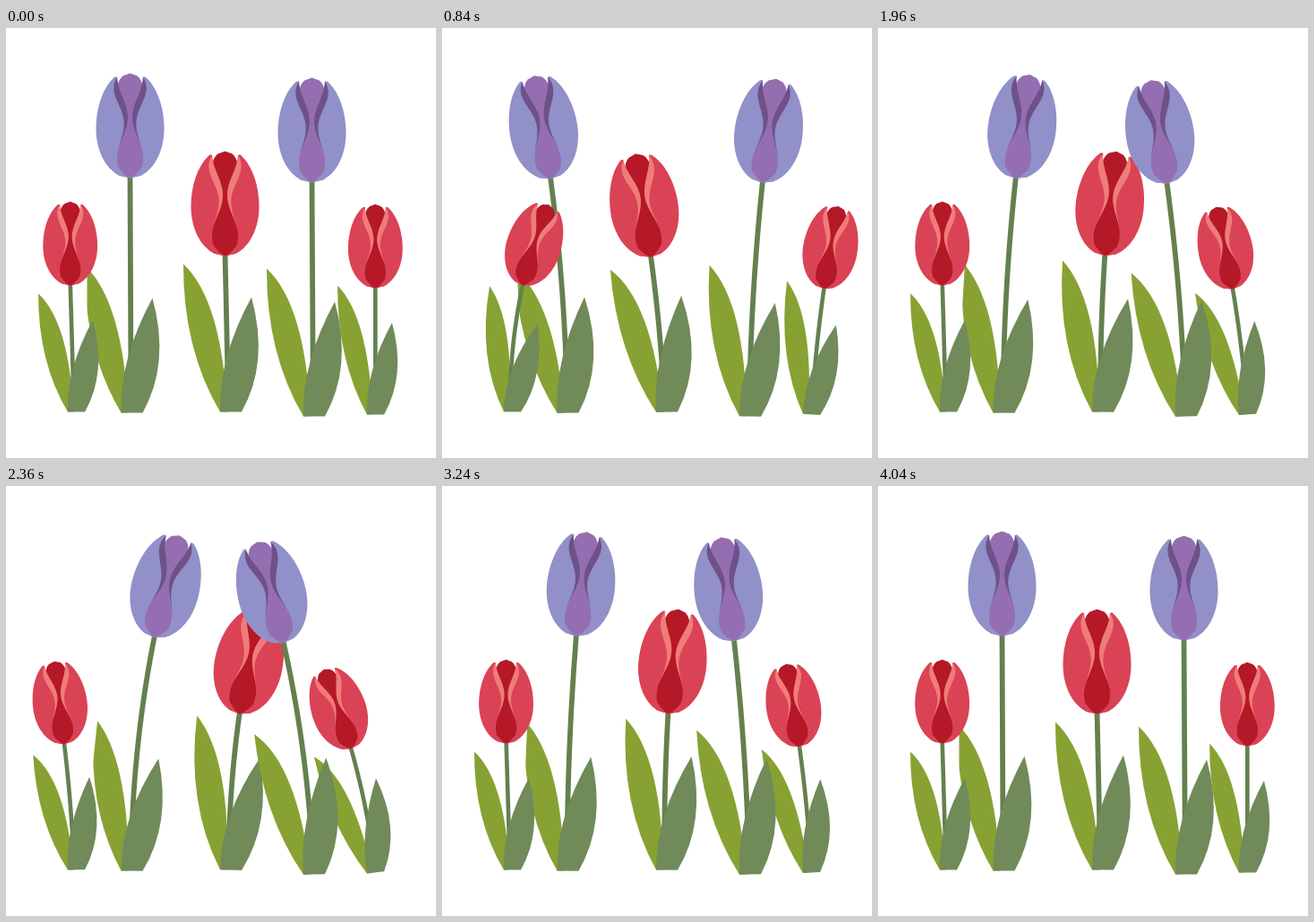
Recreate the animation shown at these times as an HTML page with a canvas. Size 480 px wide and 480 px high, loop 4080 ms.

```html
<!DOCTYPE html>
<html lang="en">
<head>
<meta charset="utf-8">
<title>Swaying tulips</title>
<style>
  html, body { margin: 0; width: 100%; height: 100%; overflow: hidden; background: #fff; }
  canvas { display: block; }
</style>
</head>
<body>
<canvas id="stage" width="480" height="480"></canvas>
<script>
const ctx = document.getElementById('stage').getContext('2d');
const LOOP = 4080, STEP = 40;
const PEAK1 = 1040, PEAK2 = 2440;

const RED = { petal: '#da4355', fold: '#f07c7a', heart: '#b51826' };
const VIOLET = { petal: '#9190c8', fold: '#6f5089', heart: '#946eb0' };
const STEM = '#64804f', LIGHT = '#87a232', DARK = '#708a59';

// Blossom outlines: half-width at height h above the stem.
const PETAL_TOP = 113, HEART_TOP = 117, FOLD_START = 28;
const outer = h => 38 * Math.sqrt(1 - ((h - 55) / (h < 55 ? 55 : 65)) ** 2);
const inner = h => (8.5 + 6 * Math.cos(2 * Math.PI * (h - 22) / 92)) * Math.sqrt(Math.min(1, h / 12));
const heart = h => Math.min(outer(h), 16 * Math.sqrt(1 - (h / HEART_TOP) ** 12));
const foldEdge = h => {
  const v = (h - FOLD_START) / (PETAL_TOP - FOLD_START);
  return inner(h) + 8 * Math.sin(Math.PI * v * v);
};

// Back to front. sway: head shift at both peaks; rest: time when it stands still again.
const tulips = [
  { x: 140.5, y: 429.6, size: 1, stem: 262, headX: -2, look: VIOLET, sway: [-28, 40.5], rest: 3880, lean: 0.05, cut: -50 },
  { x: 78.5, y: 428.4, size: 0.8, stem: 141, headX: -6.8, look: RED, sway: [34, -12], rest: 3300, lean: 0.1 },
  { x: 251, y: 428.6, size: 1, stem: 174, headX: -6.5, look: RED, sway: [-21, 27], rest: 4000, lean: 0.2 },
  { x: 412.5, y: 431.4, size: 0.8, stem: 141, headX: -0.2, look: RED, sway: [23.5, -42], rest: 4000, lean: 0.5, leaf: 1.09 },
  { x: 344, y: 433.5, size: 1, stem: 261, headX: -2.5, look: VIOLET, sway: [25.5, -46], rest: 4000, lean: 0.2 }
];

function ease(t, from, to) {
  const u = Math.min(1, Math.max(0, (t - from) / (to - from)));
  return (1 - Math.cos(Math.PI * u)) / 2;
}

function shiftAt({ sway: [a, b], rest }, t) {
  if (t < PEAK1) return a * ease(t, 0, PEAK1);
  if (t < PEAK2) return a + (b - a) * ease(t, PEAK1, PEAK2);
  return b * (1 - ease(t, PEAK2, rest));
}

// Tilts a plant's axis at the root and bends it into an arc.
function bender(plant, t) {
  const reach = plant.stem + 58 * plant.size;
  const slope = shiftAt(plant, t) / reach;
  const tilt = plant.lean * slope;
  const curve = 2 * (slope - tilt) / reach || 1e-7;
  return (x, h) => {
    const a = tilt + curve * h;
    return [
      plant.x + (Math.cos(tilt) - Math.cos(a)) / curve + x * Math.cos(a),
      plant.y - (Math.sin(a) - Math.sin(tilt)) / curve + x * Math.sin(a)
    ];
  };
}

function trace(points) {
  ctx.beginPath();
  for (const p of points) ctx.lineTo(...p);
}

function fill(color) {
  ctx.fillStyle = color;
  ctx.fill();
}

function drawTulip(plant, t) {
  const { size, stem, headX, look, cut, leaf = 1 } = plant;
  const bend = bender(plant, t);

  // Two curved edges that meet in the tip.
  function blade(left, leftBow, tip, rightBow, right, color, tall = 1) {
    const at = ([x, h]) => bend(x * size, h * size * tall);
    ctx.beginPath();
    ctx.moveTo(...at(left));
    ctx.quadraticCurveTo(...at(leftBow), ...at(tip));
    ctx.quadraticCurveTo(...at(rightBow), ...at(right));
    fill(color);
  }

  // Blossom area between two outlines, from height lo to hi.
  function band(near, far, lo, hi, color) {
    const up = [], down = [], n = 40;
    for (let i = 0; i <= n; i++) {
      const h = lo + (hi - lo) * i / n;
      const at = x => bend(headX + x * size, stem + h * size);
      up.push(at(far(h)));
      down.unshift(at(near(h)));
    }
    trace([...up, ...down]);
    fill(color);
  }

  ctx.save();
  if (cut) {
    trace([[cut, -9], [cut, 90], [cut, 180], [60, 180], [60, -9]].map(p => bend(...p)));
    ctx.clip();
  }
  blade([-12, 0], [-53.5, 70], [-53, 165], [-10, 125], [-4, 0], LIGHT, leaf);
  ctx.restore();

  const line = [];
  for (let u = 0; u <= 1; u += 1 / 16)
    line.push(bend(headX * (1 + u) / 2, 30 + (stem - 26) * u));
  trace(line);
  ctx.strokeStyle = STEM;
  ctx.lineWidth = 5.8 * size;
  ctx.stroke();

  blade([-12, 0], [-14, 60], [23, 128], [43, 55], [12, 0], DARK);

  band(h => -heart(h), heart, 0, HEART_TOP, look.heart);
  for (const side of [-1, 1]) {
    const mirror = edge => h => side * edge(h);
    band(mirror(inner), mirror(outer), 0, PETAL_TOP, look.petal);
    band(mirror(inner), mirror(foldEdge), FOLD_START, PETAL_TOP, look.fold);
  }
}

function frame(now) {
  const t = Math.floor(now % LOOP / STEP) * STEP;
  ctx.fillStyle = '#fff';
  ctx.fillRect(0, 0, 480, 480);
  for (const plant of tulips) drawTulip(plant, t);
  requestAnimationFrame(frame);
}

frame(performance.now());
</script>
</body>
</html>
```
